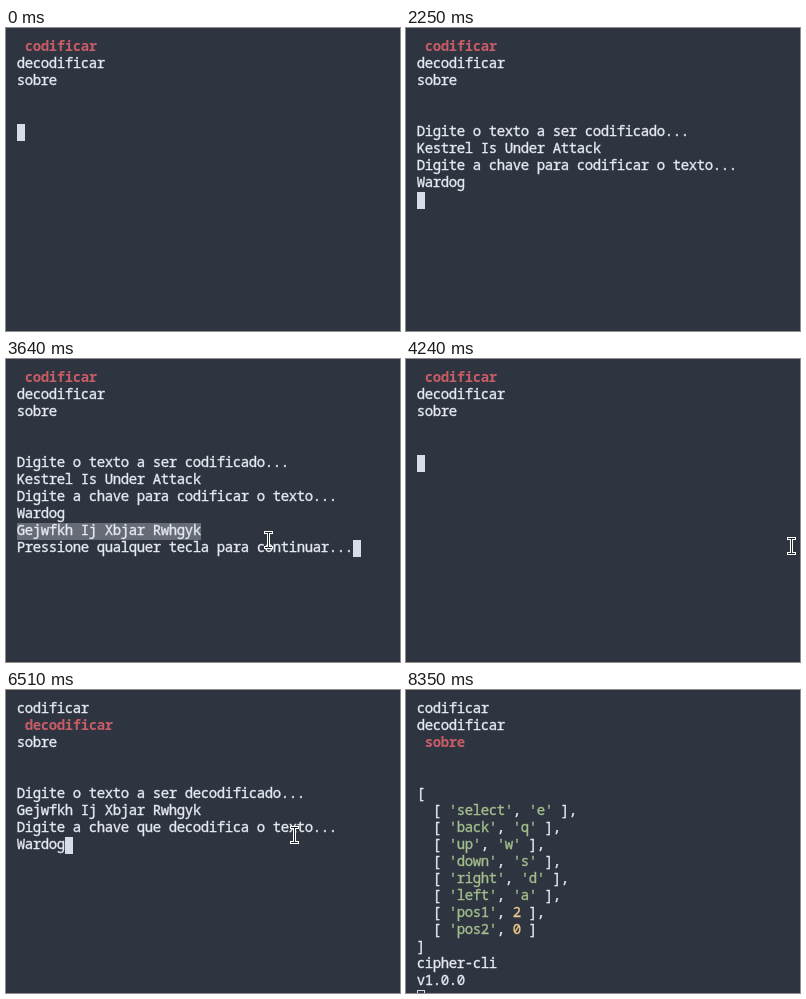
Write an HTML page with a canvas that moves like this. It is 394 px wide and 303 px high and loops after 8.38 s.

```html
<!DOCTYPE html>
<html lang="pt">
<head>
<meta charset="utf-8">
<title>cipher-cli</title>
<style>
  html, body { margin: 0; width: 100%; height: 100%; overflow: hidden; background: #2e3440; }
  canvas { display: block; }
</style>
</head>
<body>
<canvas id="stage" width="394" height="303"></canvas>
<script>
const canvas = document.getElementById('stage');
const ctx = canvas.getContext('2d');
const LOOP = 8380, EDGE = 11, CW = 8, CH = 17, OUTPUT_ROW = 5;
const BG = '#2e3440', FG = '#e5e9f0', RED = '#c95d66', GREEN = '#a3be8c',
      YELLOW = '#ebcb8b', BLOCK = '#d8dee9', SELECT = '#666b75';
const FONT = '14px "Noto Sans Mono", "DejaVu Sans Mono", monospace';

const MENU = ['codificar', 'decodificar', 'sobre'];
const PLAIN = 'Kestrel Is Under Attack', CODED = 'Gejwfkh Ij Xbjar Rwhgyk';
const WAIT = 'Pressione qualquer tecla para continuar...';
const BINDINGS = { select: 'e', back: 'q', up: 'w', down: 's', right: 'd', left: 'a', pos1: 2, pos2: 0 };
const quote = v => typeof v === 'string' ? `'${v}'` : v;
const ABOUT = [
  '[',
  ...Object.entries(BINDINGS).map(([k, v]) => `  [ '${k}', ${quote(v)} ]${k === 'pos2' ? '' : ','}`),
  ']', 'cipher-cli', 'v1.0.0', ''
];

// Evenly typed text whose first and last letters appear at the given times
const type = (text, t, first, last) =>
  t < first ? '' : text.slice(0, 1 + Math.floor((t - first) / (last - first) * (text.length - 1)));

const ENCODE = {
  askText: 'Digite o texto a ser codificado...', input: PLAIN, paste: 600, enter: 1080,
  askKey: 'Digite a chave para codificar o texto...', next: 1210,
  key: t => type('Wardog', t, 1610, 2070), submit: 2250, result: CODED, done: 2280
};
const DECODE = {
  askText: 'Digite o texto a ser decodificado...', input: CODED, paste: 5060, enter: 5500,
  askKey: 'Digite a chave que decodifica o texto...', next: 5500,
  key: t => type('Ward', t, 5980, 6210) + type('og', t, 6410, 6510), submit: 6810, result: PLAIN, done: 6810
};

function dialog(t, d) {
  if (t < d.enter) return [d.askText, t < d.paste ? '' : d.input];
  if (t < d.next) return [d.askText, d.input, ''];
  const lines = [d.askText, d.input, d.askKey, d.key(t)];
  if (t >= d.done) lines.push(d.result, WAIT);
  else if (t >= d.submit) lines.push('');
  return lines;
}

// Selected menu item and output lines; the caret follows the last line
function screenAt(t) {
  if (t < 50) return [0, ['']];
  if (t < 4240) return [0, dialog(t, ENCODE)];
  if (t < 4320) return [0, ['']];
  if (t < 4450) return [1, ['']];
  if (t < 7260) return [1, dialog(t, DECODE)];
  if (t < 7460) return [0, ['']];
  if (t < 7580) return [1, ['']];
  return [2, t < 7690 ? [''] : ABOUT];
}

const DRAG = { from: 2910, to: 3390, x: 14, y: 174 };
const COPY = 3980;
const GLIDES = [
  { from: 430, to: 530, x: 337, y: 147 },
  { from: 2580, to: 2750, x: 382, y: 206 },
  { from: 2750, to: 2910, x: 199, y: 174 },
  DRAG,
  { from: 3390, to: 3500, x: 5, y: 168 },
  { from: 3500, to: 3950, x: 384, y: 187 },
  { from: 4560, to: 5000, x: 255, y: 136 },
  { from: 5080, to: 5150, x: 287, y: 145 },
  { from: 8080, to: 8150, x: 312, y: 252 }
];
const SHOWN = [[430, 630], [2580, 8150]];
const CLICKS = [[500, 600], [DRAG.from, 3420], [3950, 4010], [5000, 5090]];
const within = (t, spans) => spans.some(([a, b]) => t >= a && t < b);
const easeOut = k => 1 - (1 - k) ** 3;

function pointerAt(t) {
  let x = 325, y = 145;
  for (const g of GLIDES) {
    if (t < g.from) break;
    const k = easeOut(Math.min(1, (t - g.from) / (g.to - g.from)));
    x += (g.x - x) * k;
    y += (g.y - y) * k;
  }
  return [Math.round(x), Math.round(y)];
}

function write(text, col, row, color = FG, weight = '') {
  ctx.font = `${weight} ${FONT}`;
  ctx.textAlign = 'center';
  ctx.fillStyle = ctx.strokeStyle = color;
  ctx.lineWidth = 0.35;
  [...text].forEach((c, i) => {
    const x = EDGE + (col + i + 0.5) * CW, y = EDGE + row * CH + 12;
    ctx.fillText(c, x, y);
    if (!weight) ctx.strokeText(c, x, y);
  });
}

function writeColored(text, row) {
  let col = 0;
  for (const part of text.split(/('[^']*'|\b\d)/)) {
    write(part, col, row, part[0] === "'" ? GREEN : /^\d$/.test(part) ? YELLOW : FG);
    col += part.length;
  }
}

function drawCaret(col, row, hollow) {
  const x = EDGE + col * CW, y = EDGE + row * CH;
  ctx.fillStyle = BLOCK;
  ctx.fillRect(x, y, CW, CH);
  if (hollow) {
    ctx.fillStyle = BG;
    ctx.fillRect(x + 1, y + 1, CW - 2, CH - 2);
  }
}

function drawSelection(t) {
  if (t < DRAG.from || t >= COPY) return;
  const [x] = pointerAt(Math.min(t, DRAG.to - 1));
  const from = Math.max(0, Math.floor((x - EDGE) / CW));
  ctx.fillStyle = SELECT;
  ctx.fillRect(EDGE + from * CW, EDGE + 9 * CH, Math.max(0, CODED.length - from) * CW, CH);
}

function drawPointer(t) {
  if (!within(t, SHOWN)) return;
  const [x, y] = pointerAt(t);
  const beam = (color, grow) => {
    ctx.fillStyle = color;
    const bar = (bx, by, w, h) => ctx.fillRect(x + bx - grow, y + by - grow, w + 2 * grow, h + 2 * grow);
    bar(-2, -8, 7, 1);
    bar(-2, 7, 7, 1);
    bar(1, -8, 1, 16);
  };
  beam('#ffffff', 1);
  beam('#20242c', 0);
  if (within(t, CLICKS)) {
    ctx.fillStyle = 'rgba(236, 228, 30, 0.72)';
    ctx.beginPath();
    ctx.arc(x, y, 12, 0, Math.PI * 2);
    ctx.fill();
  }
}

function draw(t) {
  ctx.fillStyle = BG;
  ctx.fillRect(0, 0, canvas.width, canvas.height);
  const [active, lines] = screenAt(t);
  MENU.forEach((item, i) => i === active ? write(item, 1, i, RED, 'bold') : write(item, 0, i));
  drawSelection(t);
  lines.forEach((line, i) => {
    const row = OUTPUT_ROW + i;
    if (/^\s*\[/.test(line)) writeColored(line, row);
    else write(line, 0, row);
  });
  drawCaret(lines[lines.length - 1].length, OUTPUT_ROW + lines.length - 1, t >= 8350);
  drawPointer(t);
}

const start = performance.now();
function tick() {
  draw((performance.now() - start) % LOOP);
  requestAnimationFrame(tick);
}
tick();
</script>
</body>
</html>
```
